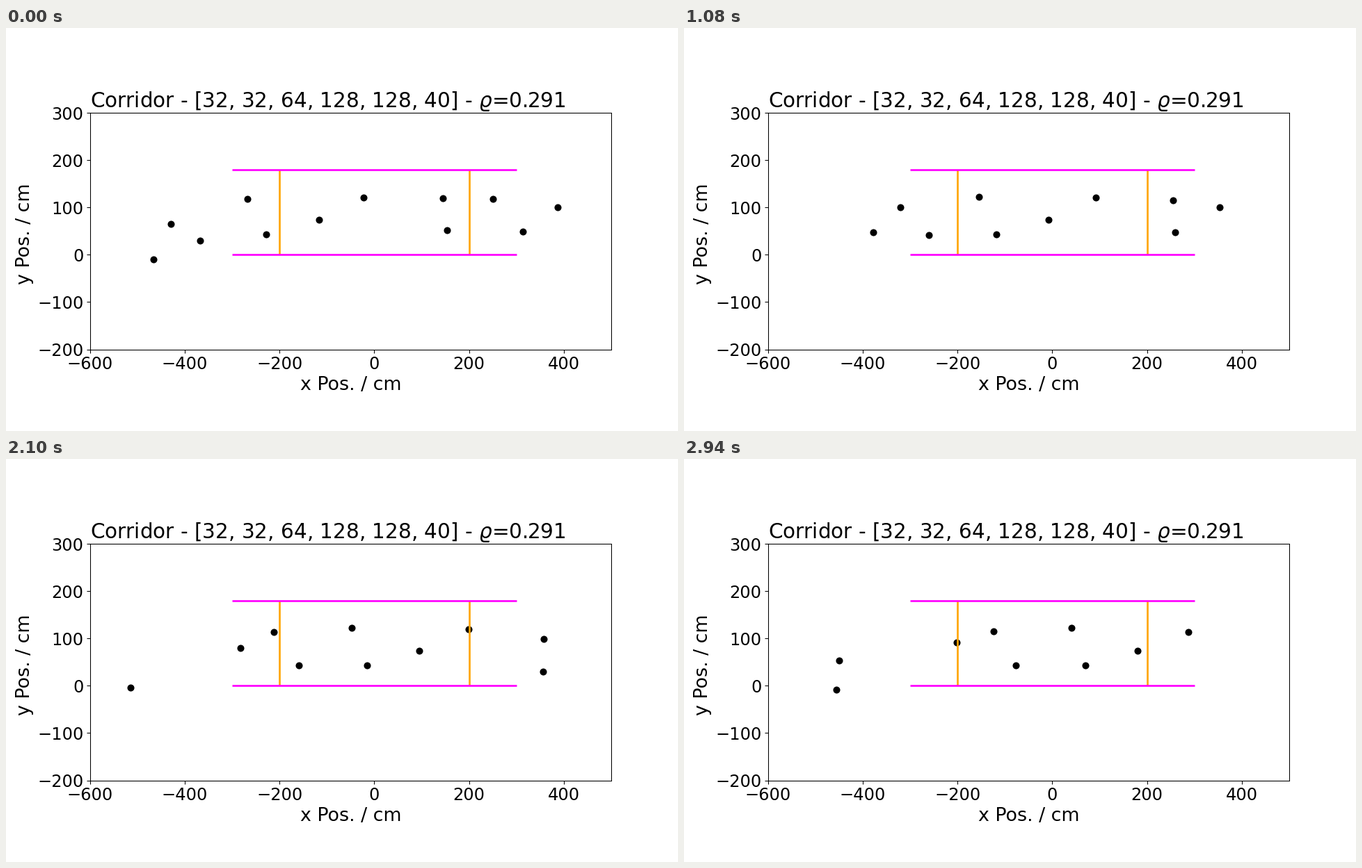
A matplotlib script that plays this animation: 966 px wide and 580 px high, repeating every 3000 ms.

```python
import numpy as np
import matplotlib.pyplot as plt
from matplotlib.animation import FuncAnimation

FRAMES, STEP = 50, 60
S = 0.966  # size of one point relative to 100 dpi
STRAIGHT = 150  # half length of the straight part of each path, in cm
EXIT_BEND = 3.4

plt.rcParams.update({
    "font.family": "DejaVu Sans",
    "axes.linewidth": 0.8 * S,
    "axes.labelpad": 4 * S,
    "axes.titlepad": 6 * S,
})
for d in "xy":
    plt.rcParams.update({
        f"{d}tick.labelsize": 18 * S,
        f"{d}tick.major.size": 3.5 * S,
        f"{d}tick.major.width": 0.8 * S,
        f"{d}tick.major.pad": 3.5 * S,
    })


class Walker:
    """Walks at constant speed along a lane that curves down at both ends."""

    def __init__(self, x, lane, speed, bend=0.0, enter=0, leave=FRAMES - 1):
        self.lane, self.bend = lane, bend
        self.enter = enter
        self.path = []
        for _ in range(enter, leave + 1):
            drop, slope = self.curve(x)
            self.path.append((x, lane - drop))
            x += speed / np.hypot(1, slope)

    def curve(self, x):
        """Distance below the lane and its slope."""
        c = 1e-5 * (self.bend if x < 0 else EXIT_BEND)
        d = max(0, abs(x) - STRAIGHT)
        return c * d**2.5, 2.5 * c * d**1.5

    def at(self, i):
        k = i - self.enter
        return self.path[k:k + 1] if k >= 0 else []


walkers = [
    Walker(-466, 92, 5.9, bend=5.75),
    Walker(-429, 115, 6.38, bend=3.8),
    Walker(-367, 43.5, 5.94, bend=1.9),
    Walker(-268, 122, 6.31, bend=3),
    Walker(-228, 42.5, 6.08),
    Walker(-116, 73.5, 6.03),
    Walker(-22, 120.5, 6.3),
    Walker(145.3, 119.5, 6.11, leave=40),
    Walker(153.4, 51.5, 5.85, leave=41),
    Walker(250.4, 121, 5.8, leave=24),
    Walker(314, 60, 5.75, leave=7),
    Walker(387.6, 130.4, 6, leave=0),
    Walker(-560, 142, 6.18, bend=5.75, enter=24),
    Walker(-487, 138, 5.58, bend=8.9, enter=40),
]

fig, ax = plt.subplots(figsize=(9.66, 5.8), dpi=100)
fig.subplots_adjust(left=0.125, right=0.9006, bottom=0.111, top=0.881)
ax.set_aspect("equal")
ax.set(xlim=(-600, 500), ylim=(-200, 300),
       xticks=range(-600, 401, 200), yticks=range(-200, 301, 100))
ax.set_title(r"Corridor - [32, 32, 64, 128, 128, 40] - $\varrho$=0.291",
             loc="left", fontsize=22 * S)
ax.set_xlabel("x Pos. / cm", fontsize=20 * S)
ax.set_ylabel("y Pos. / cm", fontsize=20 * S, y=0.488)

dots, = ax.plot([], [], "o", color="black", ms=6 * S, mew=1.5 * S, zorder=2)
line = dict(lw=2 * S, solid_capstyle="butt")
for x in (-200, 200):
    ax.plot([x, x], [0, 180], color="orange", zorder=3, **line)
for y in (0, 180):
    ax.plot([-300, 300], [y, y], color="magenta", zorder=4, **line)


def update(i):
    dots.set_data(*zip(*(p for w in walkers for p in w.at(i))))
    return dots,


anim = FuncAnimation(fig, update, frames=FRAMES, interval=STEP,
                     repeat=True, repeat_delay=0)
plt.show()
```
